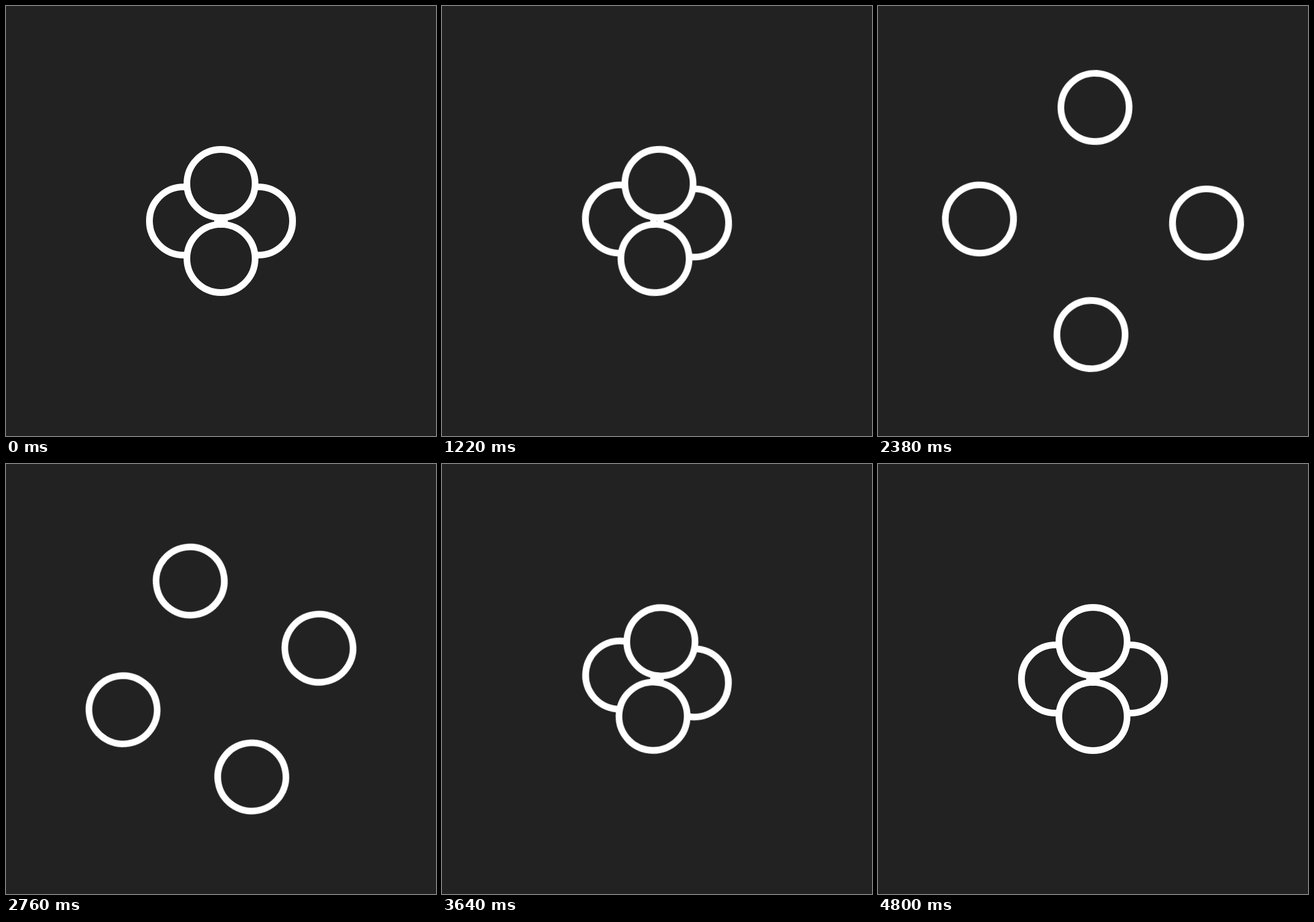
An HTML page without scripts that plays this animation: 700 by 700 pixels, repeating every 4820 ms.

```html
<!DOCTYPE html>
<html lang="en">
<head>
<meta charset="utf-8">
<title>Four rings</title>
<style>
  html, body { margin: 0; width: 100%; height: 100%; overflow: hidden; background: #222; }
  svg { display: block; width: 100vw; height: 100vh; }

  circle { fill: #222; stroke: #fff; stroke-width: 10.8; }

  /* Half turn together, one full outer orbit each, half turn again: 50 poses a second. */
  .spin, .orbit {
    transform-origin: 0 0;
    animation: spin 4820ms -2ms infinite;
  }
  .spin { animation-timing-function: steps(60); }
  .orbit { animation-name: orbit; animation-timing-function: steps(120); }

  @keyframes spin {
    0% { transform: rotate(0deg); }
    24.89627%, 74.6888% { transform: rotate(180deg); }
    99.58506%, 100% { transform: rotate(360deg); }
  }
  @keyframes orbit {
    0%, 24.89627% { transform: translateY(-123px) rotate(0deg); }
    74.6888%, 100% { transform: translateY(-123px) rotate(-360deg); }
  }
</style>
</head>
<body>
<svg viewBox="0 0 700 700">
  <g transform="translate(350 350)">
    <g class="spin">
      <g transform="rotate(90)"><g class="orbit"><circle cy="62" r="55.5"/></g></g>
      <g transform="rotate(270)"><g class="orbit"><circle cy="62" r="55.5"/></g></g>
      <g><g class="orbit"><circle cy="62" r="55.5"/></g></g>
      <g transform="rotate(180)"><g class="orbit"><circle cy="62" r="55.5"/></g></g>
    </g>
  </g>
</svg>
</body>
</html>
```
